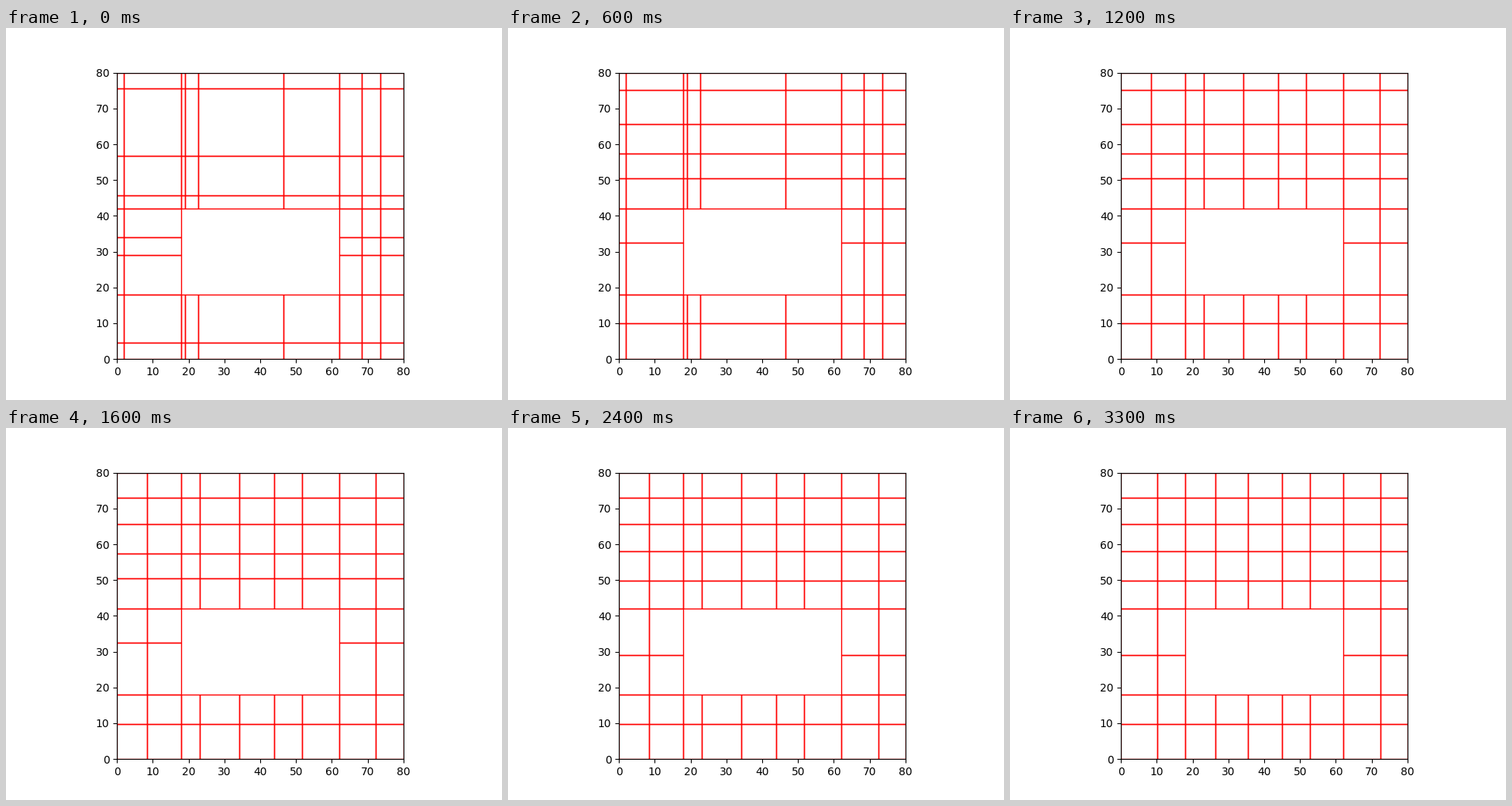
A matplotlib script for the animation above (3400 ms loop, 640x480 px).

```python
import matplotlib.pyplot as plt
from matplotlib.animation import FuncAnimation
from matplotlib.patches import Rectangle

SIZE = 80
HOLE = {"x": (18, 62), "y": (18, 42)}
FRAMES, STEP_MS = 34, 100

# step, free vertical lines, free horizontal lines
OPENING = 0, [1.9, 19, 22.7, 46.5, 68.4, 73.5], [4.6, 29, 34, 45.7, 56.8, 75.6]
REFINED = 12, [8.4, 23.1, 34.2, 43.9, 51.7, 72.2], [10, 32.5, 50.5, 57.4, 65.6, 75.2]
SETTLED = 33, [10.1, 26.4, 35.5, 45, 52.8, 72.5], [9.8, 29, 49.8, 58.1, 65.6, 73]


def moves_between(old, new):
    """Lines that change: horizontal before vertical, outside before inside."""
    moves = []
    for axis, starts, ends in zip("xy", old[1:], new[1:]):
        moves += [(axis, a, b) for a, b in zip(starts, ends) if a != b]
    return sorted(moves, key=lambda m: (m[0] == "x", -abs(m[2] - SIZE / 2)))


def lines_at(step):
    """Each line hops halfway, then home, one line after another."""
    old, new = (OPENING, REFINED) if step < REFINED[0] else (REFINED, SETTLED)
    lines = {"x": list(old[1]), "y": list(old[2])}
    moves = moves_between(old, new)
    hops = 2 * len(moves) * (step - old[0]) // (new[0] - old[0])
    for i, (axis, a, b) in enumerate(moves):
        done = min(max(hops - 2 * i, 0), 2)
        lines[axis][lines[axis].index(a)] = a + (b - a) * done / 2
    return lines


def spans(free, hole):
    edges = sorted([0, SIZE, *hole, *free])
    return list(zip(edges, edges[1:]))


def inside(span, hole):
    return hole[0] <= span[0] and span[1] <= hole[1]


def draw(step):
    for patch in list(ax.patches):
        patch.remove()
    lines = lines_at(step)
    for x0, x1 in spans(lines["x"], HOLE["x"]):
        for y0, y1 in spans(lines["y"], HOLE["y"]):
            if inside((x0, x1), HOLE["x"]) and inside((y0, y1), HOLE["y"]):
                continue
            ax.add_patch(Rectangle((x0, y0), x1 - x0, y1 - y0,
                                   fill=False, edgecolor="red", linewidth=1))
    return ax.patches


fig, ax = plt.subplots(figsize=(6.4, 4.8), dpi=100)
ticks = range(0, SIZE + 1, 10)
ax.set(xlim=(0, SIZE), ylim=(0, SIZE), aspect="equal", xticks=ticks, yticks=ticks)

anim = FuncAnimation(fig, draw, frames=FRAMES, interval=STEP_MS,
                     init_func=lambda: draw(0), repeat=True, repeat_delay=0)
plt.show()
```
